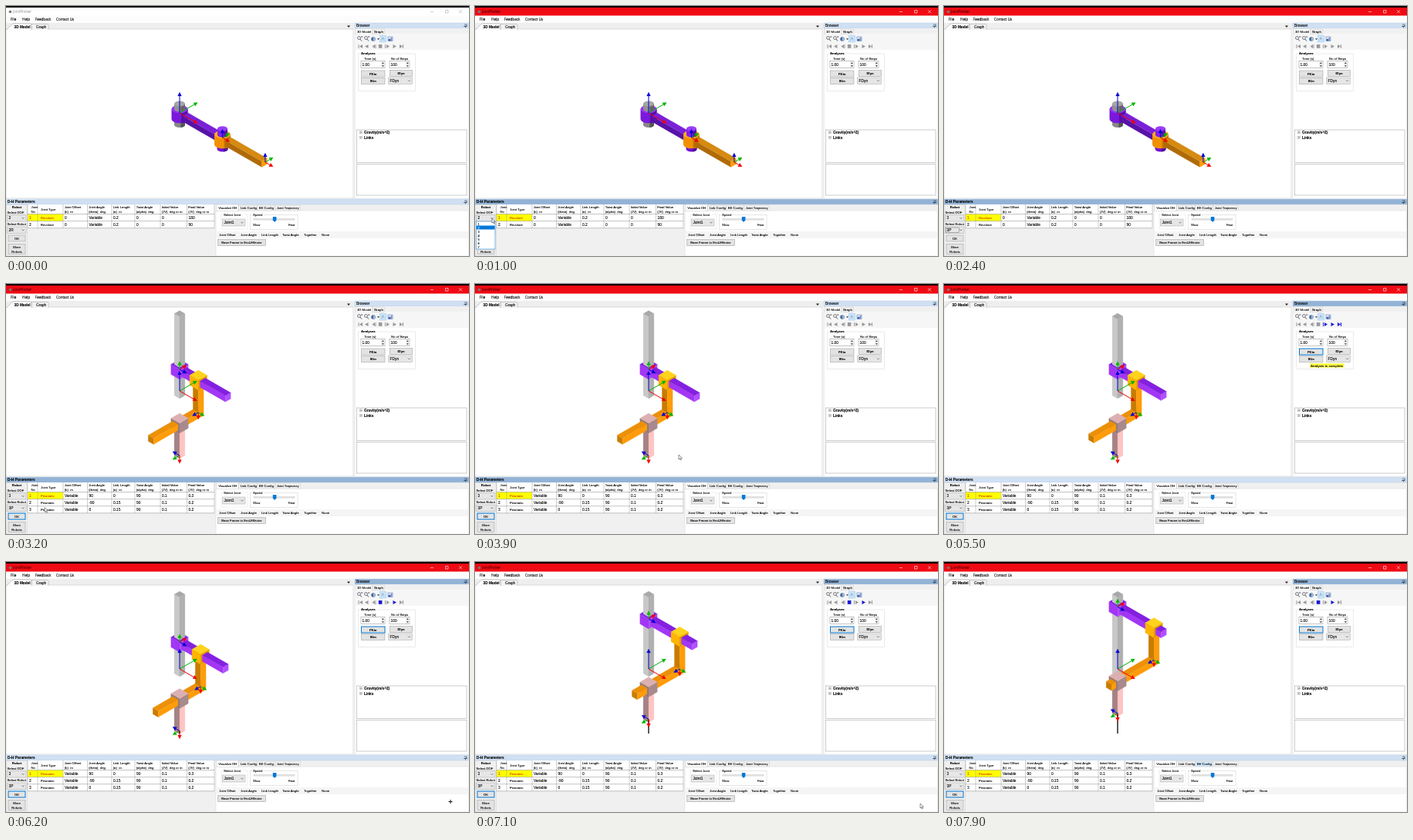
Write an HTML page that moves like this. It is 600x325 px and loops after 8000 ms.

```html
<!DOCTYPE html>
<html lang="en">
<head>
<meta charset="utf-8">
<title>Robot simulation</title>
<style>
html, body { margin: 0; width: 100%; height: 100%; overflow: hidden; background: #fff }
svg { display: block; font: 4.25px "Liberation Sans", Arial, sans-serif }
text { white-space: pre; stroke-width: .1 }
.menu { font: 4.6px "Open Sans", "Noto Sans", sans-serif }
.big { font-size: 4.75px }
.value { font-size: 4.85px }
.b { font-weight: bold }
</style>
</head>
<body>
<svg id="stage" width="600" height="325" viewBox="0 0 600 325">
<g id="panels"></g><g id="model"></g><g id="pointer"></g>
</svg>
<script>
const LOOP = 8000, BLUE = '#1818d8', GREY = '#999';
const T = { active: 400, dofList: 1000, dof: 1500, robotList: 1900, robot: 2250,
  ok: 3000, solved: 4900, play: 5600, hover: 7700 };

const rect = (x, y, w, h, fill = '#fff', stroke = 'none', lw = .5) =>
  `<rect x="${x}" y="${y}" width="${w}" height="${h}" fill="${fill}" stroke="${stroke}" stroke-width="${lw}"/>`;
const text = (x, y, s, cls = '', fill = '#000', anchor = 'start') =>
  `<text x="${x}" y="${y}" class="${cls}" fill="${fill}" stroke="${fill}" text-anchor="${anchor}">${s}</text>`;
const path = (d, fill = 'none', stroke = 'none', lw = .6) =>
  `<path d="${d}" fill="${fill}" stroke="${stroke}" stroke-width="${lw}"/>`;
const poly = (pts, fill) => path('M' + pts.map(p => p.map(v => v.toFixed(2)).join()).join('L') + 'Z', fill, fill, .2);
const circle = (x, y, r, fill, stroke = 'none') =>
  `<circle cx="${x}" cy="${y}" r="${r}" fill="${fill}" stroke="${stroke}" stroke-width=".8"/>`;
const button = (x, y, w, h, label, cls = '', focus = false) =>
  rect(x, y, w, h, '#e3e3e3', focus ? '#0078d7' : '#a5a5a5', focus ? 1 : .6) +
  text(x + w / 2, y + h / 2 + 1.6, label, cls, '#000', 'middle');
const combo = (x, y, w, h, label) => rect(x, y, w, h, '#e6e6e6', '#aaa') + text(x + 2, y + h / 2 + 1.7, label, 'value') +
  path(`M${x + w - 5.5} ${y + h / 2 - .8}l1.5 1.6 1.5-1.6`, 'none', '#444');
const spinner = (x, y, w, label) => rect(x, y, w, 9, '#fff', '#888') + text(x + 1.5, y + 6.4, label, 'value') +
  rect(x + w - 5, y + .5, 4.5, 8, '#eee') + path(`M${x + w - 4} ${y + 3.5}l1.4-1.8 1.4 1.8zm0 2.3l1.4 1.8 1.4-1.8z`, '#333');
const list = (x, y, w, items, pick) => rect(x, y, w, items.length * 5 + 1, '#fff', '#0078d7') +
  items.map((s, i) => (i === pick ? rect(x + .4, y + .5 + i * 5, w - .8, 5, '#0078d7') : '') +
    text(x + 2, y + 4.5 + i * 5, s, '', i === pick ? '#fff' : '#000')).join('');
const header = (x, y, w, label, cls, active) => rect(x, y, w, 7, active ? '#93b3d6' : '#d0e0f3', '#b4c8e0', .4) +
  text(x + 2, y + 5.2, label, cls) + path(`M594 ${y + 2}h3v2.4h-3.6h4.2M595.5 ${y + 4.4}v2`, 'none', '#234');

// ---- window panels ----
function titleBar(active) {
  return rect(0, 0, 600, 13, '#fff') + rect(0, 0, 600, 2, '#000') + rect(0, 2, 600, 10.7, active ? '#f00a14' : '#fff') +
    circle(5.5, 7.5, 1.8, '#777') + text(9, 9.4, 'JointPlotter', 'menu', active ? '#5a0000' : '#aaa') +
    path('M550 7.5h4M569.5 5.5h3.5v3.5h-3.5zM587 5.3l4 4m0-4l-4 4', 'none', active ? '#fff' : '#aaa');
}

function viewHeader() {
  const items = [[6, 'File'], [21, 'Help'], [38, 'Feedback'], [65, 'Contact Us']];
  return rect(0, 12.7, 600, 9.3, '#fcfcfc') + items.map(([x, s]) => text(x, 18.9, s, 'menu')).join('') +
    rect(0, 22, 450, 8.5, '#eee') + rect(0, 30, 450, 220, '#fff', '#bbb') +
    path('M33 30.5V23.5H54l1 1V30.5', '#f3f3f3', '#999', .5) +
    path('M1 30.5L8 23.5Q9 23 10 23H32l1 1V30.5', '#fff', '#888', .5) +
    text(10.5, 28.5, '3D Model', 'big b') + text(39, 28.5, 'Graph', 'big') + path('M442 25.5h4l-2 2.4z', '#222');
}

function playback(t) {
  const ready = t >= T.solved, playing = t >= T.play;
  const ink = [0, 0, 0, playing, ready, ready, ready].map(on => on ? BLUE : GREY);
  if (playing) ink[4] = GREY, ink[6] = GREY;
  const shapes = ['M456.5 50h1v5h-1zM462 50v5l-4-2.5z', 'M469.5 50v5l-4.5-2.5z', 'M478 50v5l-3.5-2.5zM478.5 50h1v5h-1z',
    'M482.8 50h4.6v4.8h-4.6z', 'M491 50h1v5h-1zM493 50v5l4-2.5z', 'M501.5 50v5l4.5-2.5z', 'M510 50v5l4-2.5zM514 50h1v5h-1z'];
  return shapes.map((d, i) => path(d, ink[i])).join('');
}

function browser(t) {
  const solved = t >= T.solved;
  const lens = x => circle(x, 41.5, 1.9, '#fff', '#445') + path(`M${x + 1.3} 43l2.3 2.6M${x + 2.5} 40h2.4`, 'none', '#445', .9);
  return rect(450, 22, 150, 228, '#f0f0f0') + header(452, 22, 148, 'Browser', 'big', solved) +
    rect(453, 29.5, 146, 220, '#fff') + rect(453, 29.5, 146, 7, '#f0f0f0') +
    rect(453.5, 29.5, 21, 7.5, '#fff', '#ccc') + rect(474.5, 30, 16, 6.5, '#f0f0f0', '#ccc') +
    text(455, 34.5, '3D Model') + text(477, 34.7, 'Graph') +
    rect(453, 37, 146, 20, '#f6f6f6') + lens(457.5) + lens(466.5) +
    circle(476, 43, 2.8, '#486d9c') + path('M476 40.2l2.5 1.2v3L476 46z', '#9bbbe0') + path('M481 42.3h3l-1.5 1.8z', '#222') +
    rect(484.7, 38.5, 8, 8.5, '#cce6fb', '#8cc4f0') + path('M486.5 45l1.8-4.3 2 2.1M487 41l3.5 4', 'none', '#89a') +
    rect(495, 40, 6, 5.5, '#e7eef8', '#4466aa') + rect(495.5, 42.8, 3, 2.5, '#3b5fae') + rect(498.5, 41, 2, 4.3, '#7d94c9') +
    playback(t) + rect(456.5, 62, 74, 48.5, '#fff', '#d5d5d5') + rect(459, 60, 21, 4) +
    text(460, 63.2, 'Analyses', 'b') + text(464, 70.2, 'Time (s)') + text(499, 70.2, 'No of Steps') +
    spinner(460, 71.5, 31, '1.00') + spinner(497, 71.5, 26, '100') +
    button(460.5, 84, 30.5, 8, 'FKin', 'b', solved) + button(497.5, 83.5, 29, 8, 'IDyn', 'b') +
    button(460.5, 93.5, 30.5, 8, 'IKin', 'b') + combo(495.5, 93, 31, 8.5, 'FDyn') +
    (solved && t < T.play ? rect(474, 103.3, 44.5, 5.4, '#ffff3c') + text(475, 107.5, 'Analysis is complete', 'b', '#223') : '') +
    rect(454.5, 161, 142.5, 42.5, '#fff', '#999') + rect(454.5, 205.5, 142.5, 40.5, '#fff', '#999') +
    [[164.5, 'Gravity(m/s^2)'], [171.2, 'Links']].map(([y, s]) => rect(458.5, y - 1.7, 3, 3, '#fff', '#999') +
      path(`M459.2 ${y - .2}h1.6m-.8-.8v1.6`, 'none', '#333', .4) + text(464, y + 1.6, s, 'big b')).join('');
}

const columns = [[28, 'Joint', 'No'], [41, 'Joint Type'], [74, 'Joint Offset', '(b)  m'], [105.5, 'Joint Angle', '(theta)  deg'],
  [137, 'Link Length', '(a)  m'], [167, 'Twist Angle', '(alpha)  deg'], [200, 'Initial Value', '(JV)  deg or m'],
  [234.5, 'Final Value', '(JV)  deg or m'], [270, '']];
const rows2R = ['1,Revolute,0,Variable,0.2,0,0,180', '2,Revolute,0,Variable,0.2,0,0,90'];
const rows3P = ['1,Prismatic,Variable,90,0,90,0.1,0.3', '2,Prismatic,Variable,-90,0.15,90,0.1,0.2',
  '3,Prismatic,Variable,0,0.15,90,0.1,0.2'];

function table(rows) {
  const bottom = 270.5 + rows.length * 9.1;
  let s = rect(28, 258, 242.5, bottom - 258, '#fff') + rect(28, 270.5, 46, 9.1, '#ffff00');
  columns.forEach(([x, a, b]) => {
    s += path(`M${x} 258V${bottom}`, 'none', '#999', .5);
    if (b) s += text(x + (x === 28 ? 4.5 : 1.7), 263, a) + text(x + (x === 28 ? 4.5 : 1.7), 268.8, b);
    else s += text(x + 4, 266, a);
  });
  for (let i = 0; i <= rows.length; i++) s += path(`M28 ${270.5 + i * 9.1}H270`, 'none', '#888', .5);
  rows.forEach((row, i) => row.split(',').forEach((v, j) =>
    s += text(columns[j][0] + (j === 1 ? 4 : 2), 276.8 + i * 9.1, v, j === 1 ? '' : 'value', i === 0 && j < 2 ? '#d84000' : '#000')));
  return s;
}

function parameters(t) {
  const is3P = t >= T.ok;
  let s = rect(0, 250, 600, 75, '#f0f0f0') +
    header(0, 251, 600, 'D-H Parameters', 'big b', t >= T.active && t < T.solved) +
    rect(.5, 258.5, 27, 66, '#f0f0f0', '#d0d0d0') + text(14, 262.8, 'Robot', 'b', '#000', 'middle') +
    text(1.5, 269.5, 'Select DOF') + combo(1.5, 271.5, 24.5, 8.5, t < T.dof ? '2' : '3') +
    text(1.5, 285.3, 'Select Robot') + combo(1.5, 287, 24.5, 8.5, t < T.dof ? '2R' : t < T.robot ? '3R' : '3P') +
    (t >= T.robot && !is3P ? rect(2.5, 288, 17, 6.5, 'none', '#555', .4) : '') +
    button(3, 298, 22, 8, 'OK', '', is3P) + button(3, 309.5, 22, 13, '') +
    text(14, 315.2, 'More', '', '#000', 'middle') + text(14, 320.5, 'Robots', '', '#000', 'middle') +
    table(is3P ? rows3P : rows2R);

  const hover = t >= T.hover;
  s += rect(272, 266, 327.5, 59, '#fff', '#d5d5d5');
  [[273, 28, 'Visualize DH'], [301.5, 24, 'Link Config'], [325.5, 23, 'EE Config'], [348.5, 33, 'Joint Trajectory']].forEach(([x, w, label], i) =>
    s += rect(x, i ? 259 : 258, w, i ? 7 : 8.5, i ? (hover && i === 2 ? '#cfe8fb' : '#f0f0f0') : '#fff', '#ccc') + text(x + 2.2, 264, label));
  s += rect(279, 271, 34, 19, '#fff', '#ddd') + rect(281, 269, 26, 4) + text(282, 273, 'Select Joint') + combo(280.5, 277, 29.5, 9, 'Joint1') +
    rect(316.5, 271.5, 61.5, 19, '#fff', '#ccc') + rect(319, 269, 15, 4) + text(320, 273, 'Speed') +
    rect(321, 276.6, 53, 1.5, '#e5e5e5', '#bbb', .4) + path('M345.8 274h4.6v4.6l-2.3 2.3-2.3-2.3z', '#0078d7') +
    text(320, 286.3, 'Slow') + text(366, 286.3, 'Fast') + rect(272.5, 293, 326.5, 9, '#f5f5f5');
  [[276, 'Joint Offset'], [304, 'Joint Angle'], [331, 'Link Length'], [358, 'Twist Angle'], [386, 'Together'], [409, 'None']]
    .forEach(([x, label]) => s += text(x, 299, label));
  s += button(274.5, 303.5, 62, 8, 'Base Frame to End-Effector');
  if (t >= T.dofList && t < T.dof) s += list(1.5, 280, 24.5, [1, 2, 3, 4, 5, 6, 7], t < 1250 ? 1 : 2);
  if (t >= T.robotList && t < T.robot) s += list(1.5, 295.5, 24.5, ['3R', '3P', 'RPR', 'RRP'], t < 2080 ? 0 : 1);
  return s;
}

// ---- isometric model ----
const C = Math.sqrt(3) / 2, SCALE = 280;
const X = [1, 0, 0], Y = [0, 1, 0], Z = [0, 0, 1], neg = v => v.map(n => -n);
const iso = (x, y, z) => [225 + C * (x + y), 139 + (x - y) / 2 - z];

// Three visible faces; colours are top, left, right.
function box(x0, x1, y0, y1, z0, z1, [top, left, right]) {
  return poly([iso(x0, y0, z0), iso(x1, y0, z0), iso(x1, y0, z1), iso(x0, y0, z1)], left) +
    poly([iso(x1, y0, z0), iso(x1, y1, z0), iso(x1, y1, z1), iso(x1, y0, z1)], right) +
    poly([iso(x0, y0, z1), iso(x1, y0, z1), iso(x1, y1, z1), iso(x0, y1, z1)], top);
}
const cube = (x, y, z, r, cols) => box(x - r, x + r, y - r, y + r, z - r, z + r, cols);

function arrow(p, dir, len, colour) {
  const [x, y] = iso(...p), [ex, ey] = iso(...p.map((v, i) => v + dir[i] * len));
  const n = Math.hypot(ex - x, ey - y), u = (ex - x) / n, v = (ey - y) / n, h = 5, w = 2.5;
  return path(`M${x} ${y}L${ex - u * h} ${ey - v * h}`, 'none', colour, 1) +
    poly([[ex, ey], [ex - u * h - v * w, ey - v * h + u * w], [ex - u * h + v * w, ey - v * h - u * w]], colour);
}
const frame = (p, axes, len = 11) => ['#f00000', '#00b400', '#0000d0'].map((c, i) => arrow(p, axes[i], len, c)).join('');

function cylinder(x, top, bottom, r, light, dark, cap) {
  const k = r * .5;
  return path(`M${x - r} ${top}V${bottom}A${r} ${k} 0 0 0 ${x + r} ${bottom}V${top}z`, light) +
    path(`M${x + r * .2} ${top}V${bottom + k}A${r} ${k} 0 0 0 ${x + r} ${bottom}V${top}z`, dark) +
    `<ellipse cx="${x}" cy="${top}" rx="${r}" ry="${k}" fill="${cap}"/>`;
}

function revoluteArm() {
  const purple = ['#7a20d8', '#5812a8', '#6c18c8'], orange = ['#d58a10', '#b06a08', '#ff9c08'];
  return cylinder(225, 148, 154.5, 7, '#888', '#555', '#777') +
    cylinder(225, 134, 147, 10.5, '#7a18dc', '#5610a4', '#9433f4') + cylinder(225, 127, 134, 7, '#929292', '#666', '#a6a6a6') +
    box(9, 58, -4, 4, -5, 2.5, purple) + cylinder(280.5, 178, 186, 7, '#7414d2', '#520ea0', '#7414d2') +
    cylinder(280.5, 167, 180, 10.5, '#f09000', '#c27400', '#ffab20') + cylinder(280.5, 159.5, 167.5, 6.5, '#8420e8', '#5a10b0', '#9a3cf8') +
    box(73, 127, -4, 4, -5, 2.5, orange) +
    frame([0, 0, 0], [X, Y, Z], 27) + frame([64, 0, 0], [X, Y, Z]) + frame([128, 0, 0], [X, Y, Z], 12);
}

function prismaticArm(f, solved) {
  const grey = ['#a8a8a8', '#c8c8c8', '#b0b0b0'], purple = ['#8420e0', '#a236f4', '#b050ff'],
    yellow = ['#ffd21c', '#ffb400', '#e69c00'], orange = ['#ec9008', '#c87c00', '#ff9c0a'],
    pink = ['#ffd0d0', '#a68284', '#ffc4c4'], mauve = ['#dcb0b2', '#947a7c', '#a88a8c'];
  const w = 4, r = 6.5, a = .15 * SCALE, extra = solved ? 0 : 3.5;
  const d1 = (.1 + .2 * f) * SCALE, d2 = (.1 + .1 * f) * SCALE, d3 = d2, low = d1 - a, tip = low - a;
  const end = iso(d2, -d3, tip);
  return box(-w, w, -w, w, -6, d1 - r, grey) + cube(0, 0, d1, r, purple) + box(-w, w, -w, w, d1 + r, 97 + extra, grey) +
    box(r, d2, -w, w, d1 - w, d1 + w, purple) +
    box(d2 - w, d2 + w, -d3 - w, w, low - w, low + w, orange) + box(d2 - w, d2 + w, -w, w, low + w, d1, orange) +
    cube(d2, 0, d1, r, yellow) + box(d2 + r, 69 + extra, -w, w, d1 - w, d1 + w, purple) +
    box(d2 - w, d2 + w, -d3 - w, -d3 + w, tip, low, pink) + cube(d2, -d3, low, r, mauve) +
    box(d2 - w, d2 + w, -67.5 - extra, -d3 - r, low - w, low + w, orange) +
    (f ? path(`M${end}L225 ${iso(28, -28, -56)[1]}`, 'none', '#000', 1.3) : '') +
    frame([0, 0, 0], [X, Y, Z], 26) + frame([0, 0, d1], [Y, Z, X], 10.5) +
    frame([d2, 0, low], [neg(Z), X, neg(Y)], 9) + frame([d2, -d3, tip], [neg(Z), neg(Y), neg(X)], 10.5);
}

// ---- timing ----
function track(keys, t) {
  const i = keys.findIndex(k => k[0] > t);
  if (i < 0) return keys.at(-1).slice(1);
  if (!i) return keys[0].slice(1);
  const a = keys[i - 1], b = keys[i], u = (t - a[0]) / (b[0] - a[0]);
  return a.slice(1).map((v, j) => v + (b[j + 1] - v) * u);
}
const cycloid = u => u - Math.sin(2 * Math.PI * u) / (2 * Math.PI);
const progress = [[T.play, 0], [6200, .278], [7100, .583], [7900, .785], [LOOP, .808]];
const route = [[200, 230, 225], [850, 22, 276], [1100, 22, 276], [1400, 10, 293], [1500, 10, 293], [1850, 22, 291],
  [1950, 22, 291], [2200, 10, 303], [2600, 10, 303], [2850, 14, 302], [3100, 14, 302], [3800, 264, 222], [3950, 264, 222],
  [4550, 476, 88], [4950, 476, 88], [5250, 502, 53], [5650, 502, 53], [6100, 576, 311], [6200, 576, 311], [6250, 577, 314],
  [7250, 577, 314], [7650, 337, 262]];

function pointer(t) {
  if (t < 200 || (t > 2300 && t < 2550) || (t > 5350 && t < 5600) || t > 7800) return '';
  const [x, y] = track(route, t);
  return t >= 6050 && t < 6250
    ? path(`M${x - 2.5} ${y + .5}h5m-2.5-2.5v5`, 'none', '#111', 1)
    : path(`M${x} ${y}v6l1.4-1.2 1 2.2 1-.5-1-2.1h1.9z`, '#fff', '#222', .5);
}

const shown = {};
function put(id, markup) {
  if (shown[id] !== markup) document.getElementById(id).innerHTML = shown[id] = markup;
}

function draw(t) {
  put('panels', titleBar(t >= T.active) + viewHeader() + browser(t) + parameters(t));
  put('model', t < T.ok ? revoluteArm() : prismaticArm(cycloid(track(progress, t)[0]), t >= T.solved));
  put('pointer', pointer(t));
}

const origin = performance.now();
function tick() {
  draw((performance.now() - origin) % LOOP);
  requestAnimationFrame(tick);
}
tick();
</script>
</body>
</html>
```
